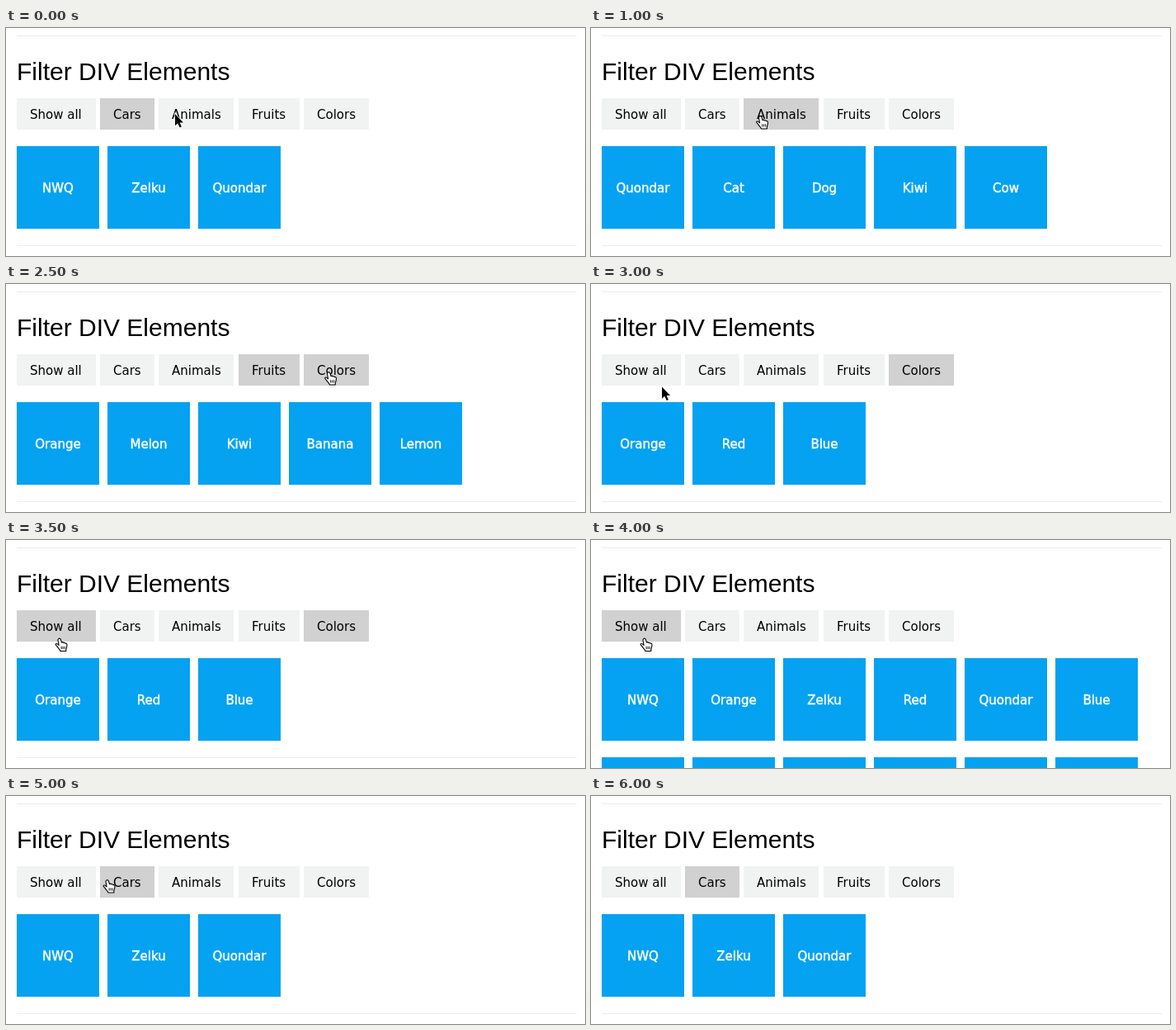
These frames come from a looping animation (702x276 px, 6.5 s). An HTML page:

```html
<!DOCTYPE html>
<html lang="en">
<head>
<meta charset="utf-8">
<title>Filter DIV Elements</title>
<style>
  html, body { margin: 0; width: 100%; height: 100%; overflow: hidden; background: #fff; }
  svg { display: block; width: 702px; height: 276px; }
  text { font: 15px "DejaVu Sans", Verdana, sans-serif; }
  .title { font: 30px "Liberation Sans", Arial, sans-serif; }
  .tile rect { fill: #05a2f1; }
  .tile text { fill: #fff; stroke: #fff; stroke-width: .45; text-anchor: middle; }
</style>
</head>
<body>
<svg viewBox="0 0 702 276" xmlns="http://www.w3.org/2000/svg">
  <rect width="702" height="276" fill="#fff"/>
  <rect x="13" y="9" width="679" height="1" fill="#eee"/>
  <rect id="rule" x="13" y="263" width="679" height="1" fill="#eee"/>
  <text class="title" x="13" y="63">Filter DIV Elements</text>
  <g id="buttons"></g>
  <g id="tiles"></g>
  <path id="arrow" d="M0 0V14.2L3.2 11.3L5.7 16.6L7.9 15.6L5.6 10.4H10Z"
        fill="#000" stroke="#fff" stroke-width="1.4" paint-order="stroke"/>
  <g id="hand" stroke="#000" stroke-linejoin="round">
    <path fill="#fff" stroke-width="1.1" d="M4.2 1.1C5 .2 6.4 .6 6.8 1.9L8 5.6C8.6 4.9 9.9 5 10.2 6
      C11 5.4 12.1 5.8 12.3 6.7C13.3 6.3 14.4 6.9 14.4 8.2C14.6 10.5 13.6 12.3 13.3 14V16H6.5
      C6 14 3.9 12.6 2.7 10.6C2 9.4 .4 8.6 .6 7.6C1 6.6 2.6 6.8 3.6 8L4.6 8.8L3.5 3C3.3 2.2 3.6 1.6 4.2 1.1Z"/>
    <path fill="none" stroke-width=".9" d="M7.6 10.3V13.6M9.6 10.3V13.6M11.6 10.3V13.6"/>
  </g>
</svg>
<script>
const STEP = 500, LOOP = 6500;
const $ = id => document.getElementById(id);

// label, left edge, width
const buttons = [
  ["Show all", 13, 96], ["Cars", 114, 66], ["Animals", 185, 91],
  ["Fruits", 282, 74], ["Colors", 361, 79]
];
const [ALL, CARS, ANIMALS, FRUITS, COLORS] = buttons.keys();

const items = [
  ["NWQ", CARS], ["Orange", FRUITS, COLORS], ["Zelku", CARS], ["Red", COLORS],
  ["Quondar", CARS, ANIMALS], ["Blue", COLORS], ["Cat", ANIMALS], ["Dog", ANIMALS],
  ["Melon", FRUITS], ["Kiwi", FRUITS, ANIMALS], ["Banana", FRUITS],
  ["Lemon", FRUITS], ["Cow", ANIMALS]
];

// start time, active filter, hovered button, pointer, x, y
const scenes = [
  [0, CARS, null, "arrow", 205, 104],
  [1000, ANIMALS, ANIMALS, "hand", 200, 106],
  [1500, ANIMALS, FRUITS, "hand", 336, 106],
  [2000, FRUITS, FRUITS, "hand", 336, 106],
  [2500, FRUITS, COLORS, "hand", 386, 106],
  [3000, COLORS, null, "arrow", 86, 124.5],
  [3500, COLORS, ALL, "hand", 59.5, 118.5],
  [4000, ALL, ALL, "hand", 59.5, 118.5],
  [4500, ALL, CARS, "hand", 117.5, 101],
  [5000, CARS, CARS, "hand", 117.5, 101],
  [5500, CARS, null, null, 0, 0]
];

function add(parent, tag, attrs, label) {
  const el = document.createElementNS("http://www.w3.org/2000/svg", tag);
  for (const key in attrs) el.setAttribute(key, attrs[key]);
  if (label) el.textContent = label;
  return parent.appendChild(el);
}

const buttonRects = buttons.map(([label, x, width]) => {
  const rect = add($("buttons"), "rect", { x, y: 85, width, height: 38 });
  add($("buttons"), "text", { x: x + 16, y: 110 }, label);
  return rect;
});

const tiles = items.map(([label]) => {
  const tile = add($("tiles"), "g", { class: "tile" });
  add(tile, "rect", { width: 100, height: 100 });
  add(tile, "text", { x: 50, y: 56 }, label);
  return tile;
});

function show(el, visible) {
  el.setAttribute("visibility", visible ? "visible" : "hidden");
}

function draw(time) {
  const [, active, hover, pointer, px, py] = scenes.findLast(s => s[0] <= time);

  buttonRects.forEach((rect, i) =>
    rect.setAttribute("fill", i === active || i === hover ? "#d1d1d1" : "#f1f3f2"));

  let count = 0;
  items.forEach(([, ...groups], i) => {
    const visible = active === ALL || groups.includes(active);
    show(tiles[i], visible);
    if (!visible) return;
    const x = 13 + 110 * (count % 6), y = 143 + 120 * Math.floor(count / 6);
    tiles[i].setAttribute("transform", `translate(${x} ${y})`);
    count++;
  });
  show($("rule"), count <= 6);

  for (const id of ["arrow", "hand"]) {
    show($(id), id === pointer);
    $(id).setAttribute("transform", `translate(${px} ${py})`);
  }
}

const start = performance.now();
let last = -1;
function tick() {
  const time = (performance.now() - start) % LOOP;
  const step = Math.floor(time / STEP);
  if (step !== last) draw(time);
  last = step;
  requestAnimationFrame(tick);
}
tick();
</script>
</body>
</html>
```
